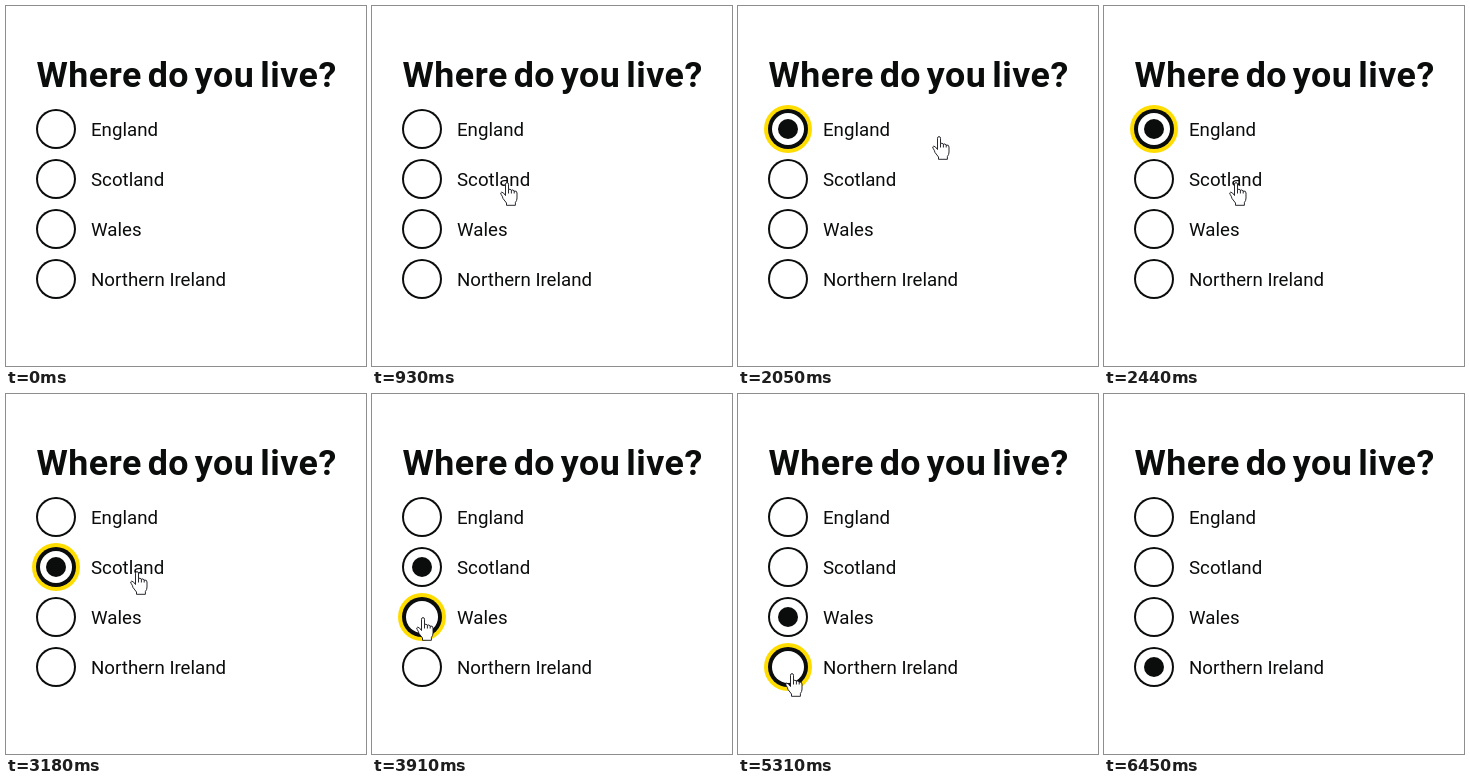
These frames come from a looping animation (360x360 px, 6500 ms). An HTML page with a canvas:

```html
<!DOCTYPE html>
<html lang="en">
<head>
<meta charset="utf-8">
<title>Where do you live?</title>
<style>
  html, body { margin: 0; width: 100%; height: 100%; overflow: hidden; background: #fff; }
  canvas { display: block; width: 360px; height: 360px; }
</style>
</head>
<body>
<canvas id="stage"></canvas>
<script>
const SIZE = 360, LOOP = 6500;
const INK = '#0b0c0c', FOCUS = '#ffdd00';
const FONT = 'Roboto, Arial, sans-serif';
const LABELS = ['England', 'Scotland', 'Wales', 'Northern Ireland'];

const canvas = document.getElementById('stage');
const ctx = canvas.getContext('2d');
const ratio = window.devicePixelRatio || 1;
canvas.width = canvas.height = SIZE * ratio;
ctx.scale(ratio, ratio);

const easeOut = p => 1 - (1 - p) ** 2;
const easeOutQuart = p => 1 - (1 - p) ** 4;
const easeInOut = p => p * p * (3 - 2 * p);
const easeInOutCubic = p => p < 0.5 ? 4 * p ** 3 : 1 - 4 * (1 - p) ** 3;
const linear = p => p;

// The pointer advances in discrete steps; the last one lands at `end`.
const MOVES = [
  { start: 780, end: 1130, steps: 8, from: [206, 324], to: [102, 126], ease: easeOut },
  { start: 1590, end: 1770, steps: 4, from: [102, 126], to: [197, 128], ease: easeInOut },
  { start: 2050, end: 2440, steps: 8, from: [197, 128], to: [125, 176], ease: easeInOut },
  { start: 3180, end: 3470, steps: 6, from: [125, 176], to: [44, 223], ease: easeInOutCubic },
  { start: 4250, end: 4880, steps: 11, from: [44, 223], to: [47, 279], ease: easeOutQuart },
  { start: 5580, end: 5820, steps: 5, from: [47, 279], to: [222, 362], ease: linear }
];

// [time, option index]; -1 means none
const FOCUSED = [[0, -1], [1470, 0], [2780, 1], [3910, 2], [5310, 3], [6450, -1]];
const CHECKED = [[0, -1], [1470, 0], [2900, 1], [3970, 2], [5430, 3]];

const valueAt = (track, t) => track.filter(([time]) => time <= t).pop()[1];

function pointerAt(t) {
  const move = MOVES.filter(m => m.start <= t).pop();
  if (!move) return null;
  const { start, end, steps, from, to, ease } = move;
  const interval = (end - start) / (steps - 1);
  const step = Math.min(steps, Math.floor((t - start) / interval + 0.01) + 1);
  const p = ease(step / steps);
  return from.map((v, i) => Math.round(v + (to[i] - v) * p));
}

function disc(x, y, r, color) {
  ctx.fillStyle = color;
  ctx.beginPath();
  ctx.arc(x, y, r, 0, Math.PI * 2);
  ctx.fill();
}

function text(str, x, y, font, letterSpacing = '0px', wordSpacing = '0px') {
  ctx.font = font;
  ctx.letterSpacing = letterSpacing;
  ctx.wordSpacing = wordSpacing;
  ctx.fillStyle = INK;
  ctx.fillText(str, x, y);
}

function drawRadio(y, focused, checked) {
  if (focused) disc(50, y, 24, FOCUS);
  disc(50, y, 20, INK);
  disc(50, y, focused ? 16 : 18, '#fff');
  if (checked) disc(50, y, 10, INK);
}

const hand = new Path2D(
  'M5.5 13.5V2.3Q5.5 .6 7 .6T8.5 2.3V7.6Q10 6.5 11.4 8.2Q13 7.3 14.2 9' +
  'Q17 8.6 17 11V16Q17 18.6 15.4 20.5V23.3H6.5V21L3 16.5' +
  'Q2.4 14 1.2 12.5Q0 10.6 1.6 10.2Q3.2 9.9 5.5 13.5Z'
);
const knuckles = new Path2D('M8.5 7.5V11.5M11.4 8.2V11.5M14.2 9V11.5');

function drawHand([x, y]) {
  ctx.save();
  ctx.translate(x, y);
  ctx.fillStyle = '#fff';
  ctx.strokeStyle = '#101018';
  ctx.lineWidth = 0.9;
  ctx.lineJoin = 'round';
  ctx.fill(hand);
  ctx.stroke(hand);
  ctx.stroke(knuckles);
  ctx.restore();
}

function draw(t) {
  ctx.fillStyle = '#fff';
  ctx.fillRect(0, 0, SIZE, SIZE);
  text('Where do you live?', 30.5, 81.3, `700 35.8px ${FONT}`, '0.5px', '-3.6px');
  const focus = valueAt(FOCUSED, t), checked = valueAt(CHECKED, t);
  LABELS.forEach((label, i) => {
    const y = 123 + i * 50;
    drawRadio(y, i === focus, i === checked);
    text(label, 85, y + 7, `400 18.7px ${FONT}`);
  });
  const pointer = pointerAt(t);
  if (pointer) drawHand(pointer);
}

const begin = performance.now();
function tick() {
  draw((performance.now() - begin) % LOOP);
  requestAnimationFrame(tick);
}
tick();
</script>
</body>
</html>
```
